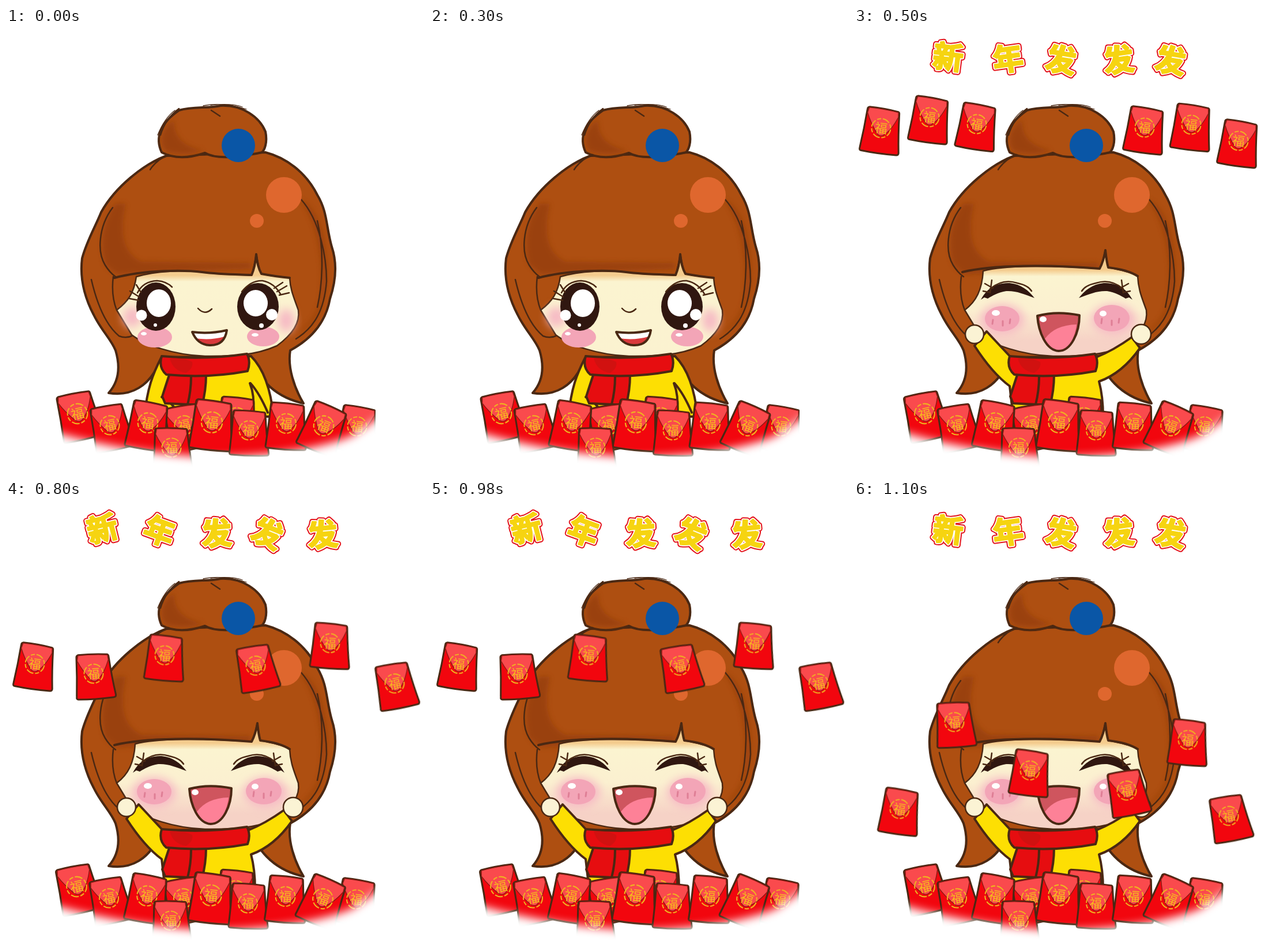
An HTML page for the animation above (1400 ms loop, 725 by 773 pixels).

```html
<!DOCTYPE html>
<html lang="zh">
<head>
<meta charset="utf-8">
<style>
  html, body { margin: 0; width: 100%; height: 100%; overflow: hidden; background: #fff; }
  svg { display: block; width: 100%; height: 100%; }
  text { font-family: "Noto Sans CJK SC", "Noto Sans CJK", sans-serif; text-anchor: middle; }
  .line { fill: none; }
  .ink { stroke: #4a2813; stroke-width: 4; stroke-linecap: round; stroke-linejoin: round; }
  .thin { stroke-width: 2.5; }
  .hair { fill: #ae4f11; }
  .coat { fill: #fddf03; }
  .scarf { fill: #e60d10; }
  .shade { fill: #943d0e; opacity: .75; filter: url(#soft); }
  .blush { fill: #f3a5b7; }
  .glow { fill: #f6b9c4; filter: url(#wide); }
  .dark { fill: #301710; }
  .white { fill: #fff; }
  .title text { font-size: 53px; font-weight: 900; stroke-linejoin: round; }
</style>
</head>
<body>
<svg viewBox="0 0 725 773">
  <defs>
    <filter id="soft" x="-30%" y="-30%" width="160%" height="160%"><feGaussianBlur stdDeviation="4"/></filter>
    <filter id="wide" x="-50%" y="-50%" width="200%" height="200%"><feGaussianBlur stdDeviation="8"/></filter>
    <linearGradient id="calmSkin" gradientUnits="userSpaceOnUse" x1="0" y1="390" x2="0" y2="570">
      <stop offset=".22" stop-color="#f4cc8e"/><stop offset=".28" stop-color="#fbf4d0"/>
      <stop offset="1" stop-color="#fbf2d0"/>
    </linearGradient>
    <linearGradient id="happySkin" gradientUnits="userSpaceOnUse" x1="0" y1="390" x2="0" y2="570">
      <stop offset=".17" stop-color="#f4cc8e"/><stop offset=".23" stop-color="#fbf4d0"/>
      <stop offset=".55" stop-color="#fbf0d0"/><stop offset=".85" stop-color="#f6d2c6"/>
    </linearGradient>
    <g id="envelope">
      <path class="ink" stroke-width="3" style="stroke-width:3" fill="#f2060e" d="M-25,-34 Q0,-35 26,-32 Q28,-31 28,-28 Q31,8 36,39 Q36,43 32,43 Q0,45 -29,43 Q-33,43 -32,38 Q-29,5 -28,-30 Q-28,-33 -25,-34Z"/>
      <path fill="#fa4a4d" stroke="#8a1a14" stroke-width="1.3" d="M-25,-33 Q0,-34 26,-31 L27,-23 Q18,2 5,12 Q0,15 -6,10 Q-20,-8 -27,-24Z"/>
      <circle class="line" r="16.5" stroke="#efb41f" stroke-width="2" stroke-dasharray="13 3 7 3"/>
      <text y="8" font-size="22" font-weight="500" fill="#f6bd1c">福</text>
    </g>
    <g id="happyEye">
      <path class="dark" d="M220,472 C232,449 250,443 270,443 C290,445 303,456 313,469 C295,462 280,456 264,457 C250,459 240,465 232,470 L226,468Z"/>
      <path class="line ink thin" d="M236,453 Q258,435 283,443 Q302,447 308,457 M227,444 L241,452 M239,438 L236,460 M224,457 L234,459"/>
    </g>
  </defs>

  <!-- hair -->
  <path class="hair ink" d="M278,222 C240,236 190,275 165,320 C155,345 140,370 132,400 C127,440 140,475 152,498 C165,525 182,540 190,560 C199,590 195,615 178,634 C215,640 250,625 270,572 L425,570 C432,600 460,640 516,652 C500,625 488,590 493,560 C530,540 555,510 562,470 C572,440 575,410 565,380 C555,345 558,320 540,290 C520,250 485,225 450,216Z"/>
  <path class="shade" d="M190,305 C170,330 160,370 172,412 L192,428 L425,418 L424,408 L235,406 C200,390 198,350 208,305Z"/>
  <path class="shade" d="M508,296 C545,340 552,420 545,470 C540,500 520,520 505,530 C550,515 562,450 554,390 C548,340 535,310 508,296Z"/>
  <path class="line ink thin" d="M185,312 C160,345 158,390 172,412 Q180,425 190,432 M512,298 C545,335 556,400 556,440 C552,490 535,520 503,540 M540,335 C553,390 548,450 540,485 M148,437 C158,480 172,515 196,535 Q208,540 221,534 M186,432 Q182,465 192,490"/>
  <path class="hair ink" d="M270,216 C258,190 268,165 300,143 C325,136 350,140 372,135 C410,133 440,155 450,180 C454,200 448,212 444,216 Q370,232 345,217 Q300,232 270,216Z"/>
  <path class="shade" d="M284,165 C268,180 266,200 276,214 Q310,224 343,213 C310,207 290,190 292,160Z"/>
  <path class="line ink thin" d="M250,246 Q262,228 282,220 M356,143 L371,153 M268,186 Q276,158 300,140" />
  <path class="line ink" style="stroke-width:1.3" d="M342,135 Q375,128 417,141 M355,134 Q390,130 410,137 M263,186 Q275,156 293,143"/>
  <circle cx="482" cy="290" r="31" fill="#df672e"/>
  <circle cx="435" cy="335" r="12" fill="#df672e"/>
  <circle cx="403" cy="204" r="29" fill="#0a56a6"/>

  <!-- calm pose -->
  <g data-on="1000">
    <path class="ink thin" fill="url(#calmSkin)" d="M226,432 C260,422 310,420 340,424 S400,428 426,429 C430,420 432,405 434,393 C437,405 438,420 443,427 C465,432 480,432 492,434 C493,455 500,470 507,490 C510,510 500,530 470,552 C430,570 390,570 345,570 C290,568 240,550 218,533 L192,490 C212,475 222,460 226,432Z"/>
    <path class="line ink" d="M188,434 C240,420 310,420 340,424 S400,428 426,429 Q432,415 434,393 Q436,415 443,427 Q470,432 492,434"/>
    <ellipse class="glow" cx="219" cy="502" rx="16" ry="18"/>
    <ellipse class="glow" cx="486" cy="508" rx="14" ry="20"/>
    <ellipse class="blush" cx="258" cy="537" rx="30" ry="18"/>
    <ellipse class="blush" cx="446" cy="536" rx="28" ry="17"/>
    <ellipse class="white" cx="239" cy="531" rx="5" ry="3"/>
    <ellipse class="white" cx="432" cy="533" rx="6" ry="3"/>
    <ellipse class="dark" cx="260" cy="484" rx="34" ry="42"/>
    <ellipse class="dark" cx="437" cy="484" rx="36" ry="41"/>
    <g class="white">
      <ellipse cx="265" cy="478" rx="21" ry="24"/><circle cx="235" cy="499" r="9.5"/><circle cx="259" cy="516" r="3"/>
      <ellipse cx="433" cy="478" rx="21" ry="23"/><circle cx="461" cy="498" r="10"/><circle cx="443" cy="517" r="4"/>
    </g>
    <path class="line ink thin" d="M228,460 Q238,440 262,439 Q278,440 288,450 M215,457 L231,467 M214,470 L230,473 M226,446 L234,459 M409,458 Q425,438 445,439 Q465,443 476,462 M470,458 L487,448 M474,464 L491,460 M465,452 L480,442"/>
    <path class="line ink thin" d="M333,487 Q345,500 357,488"/>
    <path class="white" d="M324,528 Q352,532 382,525 Q378,551 353,551 Q332,549 324,528Z"/>
    <path fill="#d9393b" d="M328,539 Q355,543 379,536 Q371,551 353,551 Q337,550 328,539Z"/>
    <path class="line ink" d="M323,528 Q352,532 383,525 Q379,552 353,551 Q332,550 323,528Z"/>
    <path class="coat ink" d="M269,573 C255,600 245,625 240,675 H464 C460,635 450,595 425,570Z"/>
    <path class="line ink" d="M423,617 Q432,640 428,665 M424,617 Q440,635 454,668 M270,641 Q285,650 291,658"/>
  </g>

  <!-- cheering pose -->
  <g data-on="0111">
    <path class="ink thin" fill="url(#happySkin)" d="M224,422 C260,412 340,412 426,418 C431,408 433,398 436,386 C438,400 439,408 441,416 C465,420 480,424 492,431 C493,455 500,470 507,490 C510,510 500,530 470,552 C430,570 390,570 345,570 C290,568 240,550 218,533 L192,490 C212,475 222,455 224,422Z"/>
    <path class="line ink" d="M188,424 C240,411 340,411 426,418 Q433,405 436,386 Q438,406 441,416 Q475,420 492,431"/>
    <ellipse class="glow" cx="257" cy="506" rx="38" ry="26"/>
    <ellipse class="glow" cx="450" cy="506" rx="38" ry="26"/>
    <ellipse class="blush" cx="257" cy="505" rx="30" ry="22"/>
    <ellipse class="blush" cx="447" cy="504" rx="31" ry="23"/>
    <ellipse class="white" cx="246" cy="495" rx="7" ry="5"/>
    <ellipse class="white" cx="432" cy="496" rx="6" ry="5"/>
    <path class="line" stroke="#df7f96" stroke-width="3" stroke-linecap="round" d="M241,507 l-1,7 M258,509 l0,8 M271,506 l-1,7 M430,505 l-1,8 M447,508 l0,8 M460,505 l-1,7"/>
    <use href="#happyEye"/>
    <use href="#happyEye" transform="matrix(-1 0 0 1 703 0)"/>
    <path fill="#cf555e" d="M318,500 Q352,491 391,499 C391,530 376,561 355,561 C333,560 320,528 318,500Z"/>
    <path fill="#fd8197" d="M331,540 Q348,516 386,515 C383,540 371,561 355,561 Q342,559 331,540Z"/>
    <ellipse class="white" cx="328" cy="506" rx="6" ry="5"/>
    <path class="line ink" d="M318,500 Q352,491 391,499 C391,530 376,561 355,561 C333,560 320,528 318,500Z"/>
    <path class="coat ink" d="M272,572 L230,527 L209,552 Q240,600 270,622 L276,675 H432 Q432,640 425,614 Q465,600 496,556 L482,537 Q450,560 420,572Z"/>
    <circle class="ink thin" cx="209" cy="532" r="16" fill="#fbf3d4"/>
    <circle class="ink thin" cx="498" cy="532" r="17" fill="#fbf3d4"/>
  </g>

  <!-- scarf -->
  <path class="scarf ink" d="M284,600 L347,602 Q347,630 340,655 L276,652 L271,640 Q278,618 284,600Z"/>
  <path class="line ink" d="M321,606 Q321,630 315,654"/>
  <path class="scarf ink" d="M270,570 Q345,577 418,566 Q425,580 419,596 Q350,609 278,602 Q264,590 270,570Z"/>
  <path fill="#c31512" d="M284,574 Q305,571 323,580 Q325,592 312,599 Q290,596 284,574Z" opacity=".6"/>

  <g id="pile"></g>
  <path class="white" filter="url(#wide)" d="M-40,702 L90,704 Q220,740 365,746 Q520,741 600,708 L650,674 H780 V830 H-40Z"/>
  <path class="white" d="M641,640 H725 V773 H641Z"/>
  <g id="flying"></g>
</svg>
<script>
  const LOOP = 1400, STARTS = [0, 500, 800, 1100];

  // x, y of the emblem, rotation, scale
  const pile = [
    [400, 676, 4, 1], [309, 690, -12, 1], [124, 670, -13, 1.05], [180, 690, -12, 1],
    [246, 686, 9, 1.05], [357, 685, 6, 1.1], [421, 699, 2, 1], [486, 687, 4, 1.03],
    [609, 692, 8, 1], [551, 691, 22, 1.05], [287, 729, -1, 1]
  ];
  const flights = [
    { on: '0100', envelopes: [[47, 174, 8], [131, 155, 8], [213, 167, 9], [504, 173, 8], [585, 168, 7], [667, 196, 8]] },
    { on: '0010', envelopes: [[50, 283, 8], [152, 300, -4], [275, 268, 5], [433, 286, -11], [562, 247, 4], [674, 317, -11]] },
    { on: '0001', envelopes: [[174, 384, -4], [79, 535, 8], [305, 468, 7], [579, 415, 5], [473, 503, -11], [650, 547, -11]] }
  ];
  // x, y of the centre and rotation for each character
  const titles = [
    { on: '0101', places: [[163, 51, 7], [267, 54, -8], [359, 56, 9], [459, 56, -8], [549, 57, 9]] },
    { on: '0010', places: [[167, 49, -14], [266, 53, 20], [365, 57, -4], [453, 57, 22], [549, 59, -6]] }
  ];
  const outlines = [['#e3141c', 10], ['#fff', 6], ['#f6d411', 2.5]];

  const place = ([x, y, turn, size = 1]) =>
    `transform="translate(${x} ${y}) rotate(${turn}) scale(${size})"`;
  const envelope = spot => `<use href="#envelope" ${place(spot)}/>`;
  const glyph = (char, spot) => `<g ${place(spot)}>` + outlines.map(([color, width]) =>
    `<text y="19" fill="${width > 3 ? 'none' : color}" stroke="${color}" stroke-width="${width}">${char}</text>`).join('') + '</g>';

  const shift = dx => pile.map(([x, ...rest]) => envelope([x + dx, ...rest])).join('');
  document.getElementById('pile').innerHTML =
    `<g data-on="1000">${shift(0)}</g><g data-on="0111">${shift(-1.5)}</g>`;
  document.getElementById('flying').innerHTML =
    flights.map(f => `<g data-on="${f.on}">${f.envelopes.map(envelope).join('')}</g>`).join('') +
    titles.map(t => `<g class="title" data-on="${t.on}">${t.places.map((p, i) => glyph('新年发发发'[i], p)).join('')}</g>`).join('');

  for (const el of document.querySelectorAll('[data-on]')) {
    const on = el.dataset.on;
    const steps = STARTS.map((start, i) => ({ offset: start / LOOP, opacity: on[i], easing: 'step-end' }));
    el.animate([...steps, { offset: 1, opacity: on[3] }], { duration: LOOP, iterations: Infinity });
  }
</script>
</body>
</html>
```
